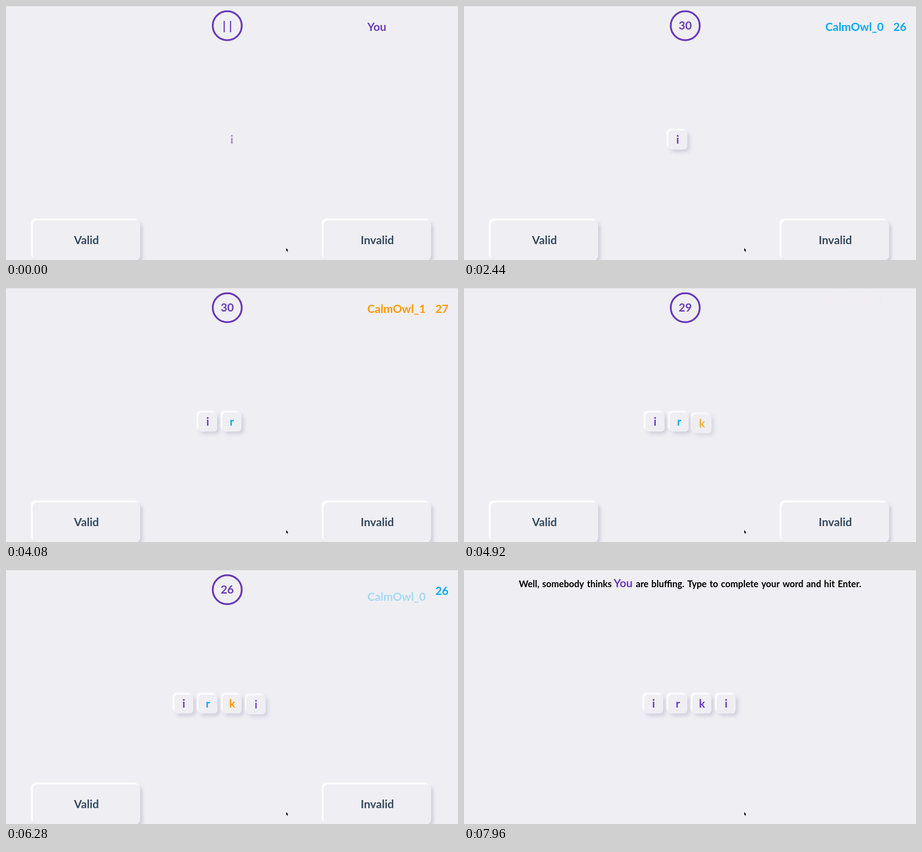
Write an HTML page with a canvas that moves like this. It is 997x561 px and loops after 8000 ms.

```html
<!DOCTYPE html>
<html lang="en">
<head>
<meta charset="utf-8">
<title>Word game</title>
<style>
  html, body { margin: 0; width: 100%; height: 100%; overflow: hidden; background: #efeef3; }
  canvas { display: block; }
</style>
</head>
<body>
<canvas id="stage" width="997" height="561"></canvas>
<script>
const ctx = document.getElementById('stage').getContext('2d');
const W = 997, H = 561, LOOP = 8000;
const BG = '#efeef3', PURPLE = '#673ab7', INK = '#34495e';
const PITCH = 53.3, MID = 498.2;

const players = [
  { name: 'You', color: PURPLE, clock: 30, ticks: [4880, 5280, 5640, 6040] },
  { name: 'CalmOwl_0', color: '#03a9f4', clock: 30, ticks: [1120, 1480, 1880, 2280, 6420, 6800, 7200] },
  { name: 'CalmOwl_1', color: '#ff9800', clock: 29, ticks: [3680, 4080, 4520] }
];
const turns = [
  { at: -1000, who: 0, dur: 200 },
  { at: 720, who: 1, dur: 120 },
  { at: 3320, who: 2, dur: 200 },
  { at: 4760, who: 0, dur: 180 },
  { at: 6040, who: 1, dur: 200 }
];
const word = 'irki';

const clamp = v => Math.min(1, Math.max(0, v));

// CSS "ease": cubic-bezier(.25, .1, .25, 1)
function ease(p) {
  p = clamp(p);
  let lo = 0, hi = 1, u = p;
  for (let i = 0; i < 20; i++) {
    const x = 0.75 * u * (1 - u) + u * u * u;
    if (x < p) lo = u; else hi = u;
    u = (lo + hi) / 2;
  }
  return 0.3 * u * (1 - u) * (1 - u) + 3 * u * u * (1 - u) + u * u * u;
}

const timeLeft = (p, t) => p.clock - p.ticks.filter(k => t >= k).length;
const firstX = n => MID - n * PITCH / 2;

function text(str, x, y, color, align = 'left', size = 25) {
  ctx.font = `700 ${size}px Lato, "Open Sans", sans-serif`;
  ctx.textAlign = align;
  ctx.fillStyle = color;
  ctx.fillText(str, x, y);
}

// Raised panel: only the light and dark shadows outside its edge show.
function panel(x, y, w, h, r, lift, blur) {
  ctx.save();
  const outside = new Path2D();
  outside.rect(0, 0, W, H + 40);
  outside.roundRect(x, y, w, h, r);
  ctx.clip(outside, 'evenodd');
  ctx.fillStyle = BG;
  for (const [color, d, b] of [['#cecdda', 5, blur], ['#ffffff', -lift, 3]]) {
    ctx.shadowColor = color;
    ctx.shadowOffsetX = ctx.shadowOffsetY = d;
    ctx.shadowBlur = b;
    ctx.beginPath();
    ctx.roundRect(x, y, w, h, r);
    ctx.fill();
  }
  ctx.restore();
}

function tile(ch, x, y, color) {
  panel(x - 21, y + 275, 42, 42, 8, 3.5, 8);
  text(ch, x, y + 304, color, 'center');
}

function button(label, x) {
  panel(x, 473.5, 237, 88, 10, 4, 7);
  text(label, x + 118.5, 526, INK, 'center');
}

function drawTimer(t) {
  ctx.strokeStyle = PURPLE;
  ctx.lineWidth = 4;
  ctx.beginPath();
  ctx.arc(488, 43.5, 32, 0, Math.PI * 2);
  ctx.stroke();
  if (t < turns[1].at) {
    ctx.fillStyle = PURPLE;
    ctx.fillRect(480, 33, 2.5, 25);
    ctx.fillRect(494, 33, 2.5, 25);
  } else {
    text(timeLeft(players[0], t), 488, 52, PURPLE, 'center');
  }
}

// The old name leaves upward, then the new one rises from below.
function drawPlayer(t, n) {
  const { at, who, dur } = turns[n];
  const age = t - at;
  const leaving = age < dur;
  const p = ease((leaving ? age : age - dur) / dur);
  const shown = players[leaving && n ? turns[n - 1].who : who];
  ctx.globalAlpha = leaving ? 1 - p : p;
  text(shown.name, 797, 54.5 + (leaving ? -20 * p : 20 * (1 - p)), shown.color);
  ctx.globalAlpha = 1;
  if (who) text(timeLeft(players[who], t), 976, 54.5, players[who].color, 'right');
}

function drawWord(t, n) {
  if (!n) {
    ctx.globalAlpha = 0.6;
    text('i', MID, 304, PURPLE, 'center');
    ctx.globalAlpha = 1;
    return;
  }
  const { at, dur } = turns[n];
  const slide = ease((t - at) / (dur * 1.5));
  const rise = ease((t - at) / (dur * 2));
  const x0 = firstX(n), from = firstX(n - 1);
  for (let i = 0; i < n; i++) {
    const color = players[turns[i].who].color;
    if (i < n - 1) {
      tile(word[i], from + (x0 - from) * slide + i * PITCH, 0, color);
    } else {
      ctx.globalAlpha = rise;
      tile(word[i], x0 + i * PITCH, 15 * (1 - rise), color);
      ctx.globalAlpha = 1;
    }
  }
}

function drawGame(t) {
  const n = turns.filter(k => t >= k.at).length - 1;
  drawTimer(t);
  drawPlayer(t, n);
  drawWord(t, n);
  button('Valid', 59);
  button('Invalid', 700.5);
}

function drawChallenge() {
  ctx.wordSpacing = '1.5px';
  text('Well, somebody thinks', 121, 38, '#000', 'left', 20);
  text('are bluffing. Type to complete your word and hit Enter.', 379, 38, '#000', 'left', 20);
  ctx.wordSpacing = '0px';
  text('You', 330, 38, PURPLE);
  [...word].forEach((ch, i) => tile(ch, firstX(3) + i * PITCH, 0, PURPLE));
}

function veil(alpha) {
  ctx.globalAlpha = alpha;
  ctx.fillStyle = BG;
  ctx.fillRect(0, 0, W, H);
  ctx.globalAlpha = 1;
}

function drawCursor() {
  ctx.fillStyle = '#111';
  ctx.strokeStyle = '#fff';
  ctx.lineWidth = 0.8;
  ctx.beginPath();
  [[618, 534.5], [618, 542], [619.6, 540.6], [620.8, 543.2], [621.8, 542.7],
   [620.8, 540.2], [622.8, 540]].forEach(p => ctx.lineTo(...p));
  ctx.closePath();
  ctx.stroke();
  ctx.fill();
}

function draw(t) {
  ctx.fillStyle = BG;
  ctx.fillRect(0, 0, W, H);
  if (t < 7480) {
    drawGame(t);
    if (t >= 7400) veil(1 - 0.27 * clamp((7480 - t) / 80));
  } else {
    drawChallenge();
    veil(1 - ease((t - 7540) / 380));
  }
  ctx.fillStyle = '#dadadf';
  ctx.fillRect(0, 0, W, 1);
  drawCursor();
}

const start = performance.now();
function frame() {
  draw((performance.now() - start) % LOOP);
  requestAnimationFrame(frame);
}
frame();
</script>
</body>
</html>
```
